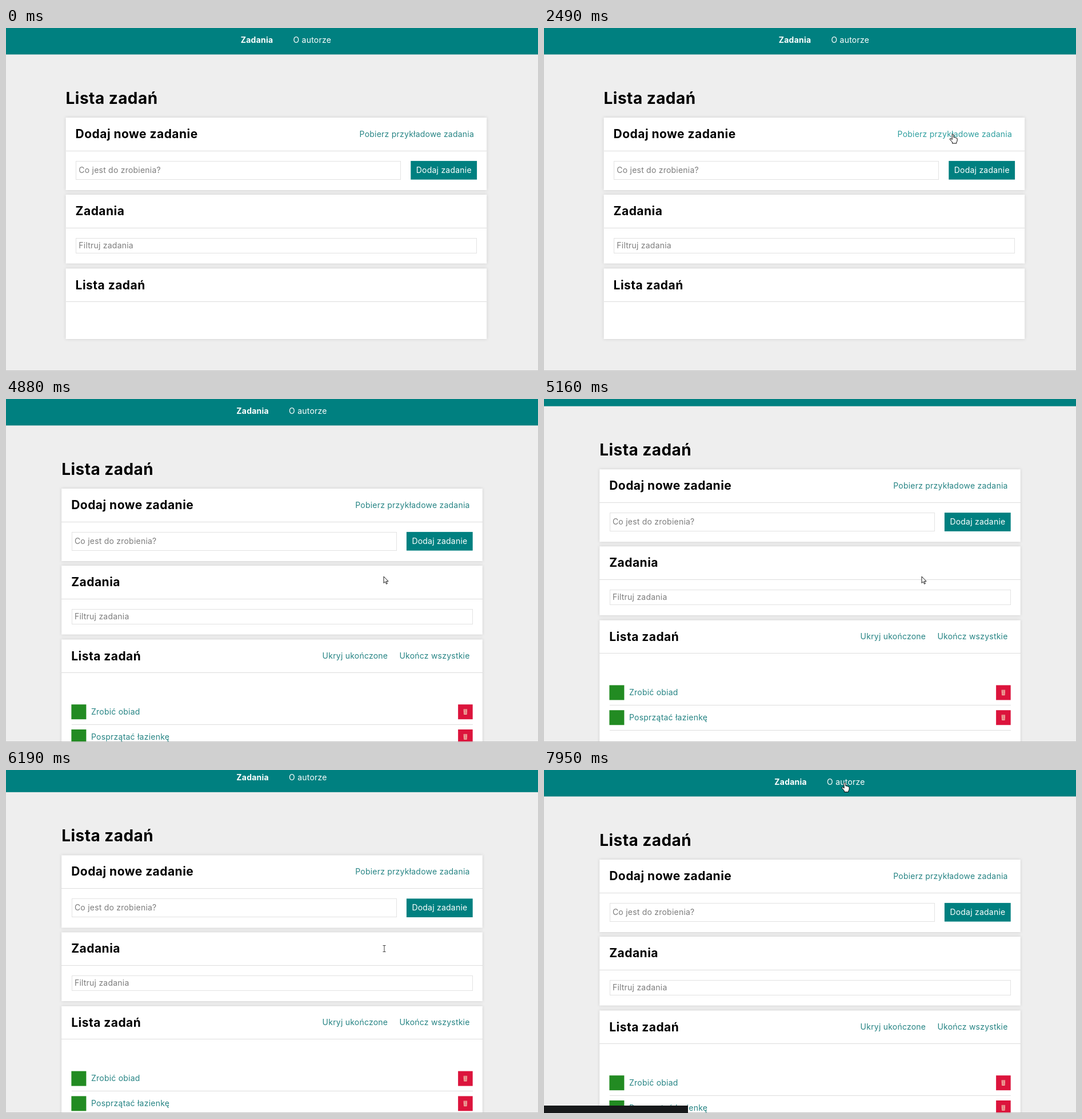
Write an HTML page that moves like this. It is 931 by 601 pixels and loops after 8000 ms.

```html
<!DOCTYPE html>
<html lang="pl">
<head>
<meta charset="utf-8">
<title>Lista zadań</title>
<style>
html, body { margin: 0; height: 100%; overflow: hidden; background: #eee; }
svg { display: block; font: 14px Inter, "Open Sans", sans-serif; letter-spacing: .016em; }
line, .input { shape-rendering: crispEdges; }
line { stroke: #ddd; }
.h1, .h2 { font-weight: 700; }
.h1 { font-size: 28px; letter-spacing: .016em; }
.h2 { font-size: 21px; letter-spacing: .022em; }
.card { fill: #fff; filter: drop-shadow(0 0 2.5px #ccc); }
.input { fill: #fff; stroke: #e2e2e2; }
.hint { fill: #7d7d7d; }
.teal { fill: #008080; }
.link, .task { fill: #268484; }
.link { text-anchor: end; }
.hover { filter: brightness(1.2); }
#button.hover { filter: brightness(1.03); }
.busy { fill: #ddd; }
.white { fill: #fff; }
.mid { text-anchor: middle; }
</style>
</head>
<body>
<svg width="931" height="601" viewBox="0 0 931 601">
  <g id="page">
    <rect class="teal" x="-10" y="-70" width="960" height="116.4"/>
    <text class="white mid" x="439" y="26" font-weight="700">Zadania</text>
    <text class="white mid" x="535.8" y="26">O autorze</text>
    <text class="h1" x="104.6" y="133">Lista zadań</text>

    <rect class="card" x="104.6" y="157" width="736.6" height="127"/>
    <line x1="104.6" x2="841.2" y1="215.5" y2="215.5"/>
    <text class="h2" x="121.6" y="193">Dodaj nowe zadanie</text>
    <text class="link" x="819" y="191" id="fetch"></text>
    <rect class="input" x="122.5" y="233.5" width="568" height="31.5"/>
    <text class="hint" x="127.3" y="254">Co jest do zrobienia?</text>
    <g id="button">
      <rect class="teal" x="708.3" y="232.9" width="115.8" height="32.7"/>
      <text class="white mid" x="766.3" y="254">Dodaj zadanie</text>
    </g>

    <rect class="card" x="104.6" y="292" width="736.6" height="120.6"/>
    <line x1="104.6" x2="841.2" y1="350.5" y2="350.5"/>
    <text class="h2" x="121.6" y="328">Zadania</text>
    <rect class="input" x="122.5" y="368.5" width="701" height="26"/>
    <text class="hint" x="127.3" y="386">Filtruj zadania</text>

    <rect class="card" x="104.6" y="421.4" width="736.6" id="list"/>
    <line x1="104.6" x2="841.2" y1="479.5" y2="479.5"/>
    <text class="h2" x="121.6" y="457.5">Lista zadań</text>
    <g id="tasks">
      <text class="link" x="675.6" y="455">Ukryj ukończone</text>
      <text class="link" x="819" y="455">Ukończ wszystkie</text>
    </g>
  </g>
  <line x2="931" y1="600.5" y2="600.5" style="stroke:#c4c4c4"/>
  <rect id="status" y="588" width="252" height="13" fill="#17191b"/>

  <g id="cursor" fill="#fff" stroke="#000" stroke-linejoin="round">
    <path id="arrow" d="M0 0V11.5L2.7 9 4.5 13.2 6.3 12.4 4.5 8.4H8Z" stroke-width=".9"/>
    <path id="hand" d="M-1.4 .8Q0-.8 1.4 .8V5.5Q2.8 4.8 3.6 6 5 5.4 5.6 6.7 7.4 6.2 7.6 8V11Q7.4 13 6.3 14V16H-1V14L-5.4 8.8Q-5.4 7-3.4 7.6L-1.4 9.5Z"/>
    <path id="beam" d="M-1.5-3.5H3.5M1-3.5V7.5M-1.5 7.5H3.5" fill="none" stroke="#444"/>
    <path id="no" d="M-4.7 0A4.7 4.7 0 1 1 4.7 0 4.7 4.7 0 1 1-4.7 0M-3.3-3.3 3.3 3.3" stroke="#c4000d" stroke-width="1.8"/>
  </g>
</svg>
<script>
const $ = id => document.getElementById(id);

$('tasks').innerHTML += ['Zrobić obiad', 'Posprzątać łazienkę'].map((name, i) => `
  <g transform="translate(0 ${i * 43.8})">
    <rect x="121.8" y="535.2" width="26" height="26" fill="#228b22"/>
    <text class="task" x="156.4" y="553">${name}</text>
    <rect x="798.5" y="535.2" width="25.6" height="26" fill="#dc143c"/>
    <path d="M808 543.5h6.5l-.6 9.5h-5.2z" fill="#f0c4ae"/>
    <path d="M808.5 545h5.5M810.3 546v6M812.3 546v6" stroke="#dc143c" stroke-width=".7"/>
    <line x1="122" x2="824" y1="570.5" y2="570.5"/>
  </g>`).join('');

// start, end, steps, from x y, to x y, easing power
const moves = [
  [790, 1560, 12, 885, 690, 766, 217, .6],
  [1630, 2030, 7, 766, 217, 715, 186, 1],
  [2490, 3140, 11, 715, 186, 721, 187, 1],
  [3280, 3420, 3, 721, 187, 742.5, 202, 1],
  [3560, 4260, 11, 742.5, 202, 746, 189, 1],
  [4670, 4880, 4, 746, 189, 661, 311, .7],
  [6590, 7280, 11, 661, 311, 530, 31, .8],
  [7410, 7950, 7, 530, 31, 526.5, 22.5, .5]
];
const LOADING = 2770, LOADED = 3980;
const kinds = [[0, ''], [790, 'arrow'], [1420, 'hand'], [1560, 'arrow'], [1830, 'hand'], [LOADING, 'no'],
  [LOADED, 'hand'], [4670, 'arrow'], [5300, 'beam'], [6590, 'arrow'], [7410, 'hand']];

const between = (t, a, b) => t >= a && t < b;
const show = (id, on) => $(id).style.display = on ? '' : 'none';
const stepAt = (t, start, end, steps) =>
  Math.max(0, Math.min(steps - 1, Math.floor((t - start) / (end - start) * (steps - 1) + 1e-6)));
const scrollEase = (t, start, end) => 1 - (1 - stepAt(t, start, end, 4) / 3) ** 1.92;

function draw(t) {
  const loaded = t >= LOADED, loading = between(t, LOADING, LOADED);
  const scroll = 62.4 * (scrollEase(t, 5090, 5300) - scrollEase(t, 6030, 6260));
  $('page').setAttribute('transform', `translate(${loaded ? -7.4 : 0} ${-scroll})`);
  $('list').setAttribute('height', loaded ? 231.6 : 123.6);
  show('tasks', loaded);

  $('fetch').textContent = loading ? 'Trwa ładowanie' : 'Pobierz przykładowe zadania';
  $('fetch').classList.toggle('busy', loading);
  $('fetch').classList.toggle('hover', between(t, 1830, LOADING) || between(t, 4400, 4670));
  $('button').classList.toggle('hover', between(t, 1420, 1630));
  show('status', t >= 7600);

  const kind = kinds.findLast(k => t >= k[0])[1];
  for (const id of ['arrow', 'hand', 'beam', 'no']) show(id, id === kind);
  const move = moves.findLast(m => t >= m[0]);
  if (move) {
    const [start, end, steps, x0, y0, x1, y1, power] = move;
    const p = ((stepAt(t, start, end, steps) + 1) / steps) ** power;
    $('cursor').setAttribute('transform', `translate(${x0 + (x1 - x0) * p} ${y0 + (y1 - y0) * p})`);
  }
}

function frame() {
  draw(performance.now() % 8000);
  requestAnimationFrame(frame);
}
frame();
</script>
</body>
</html>
```
